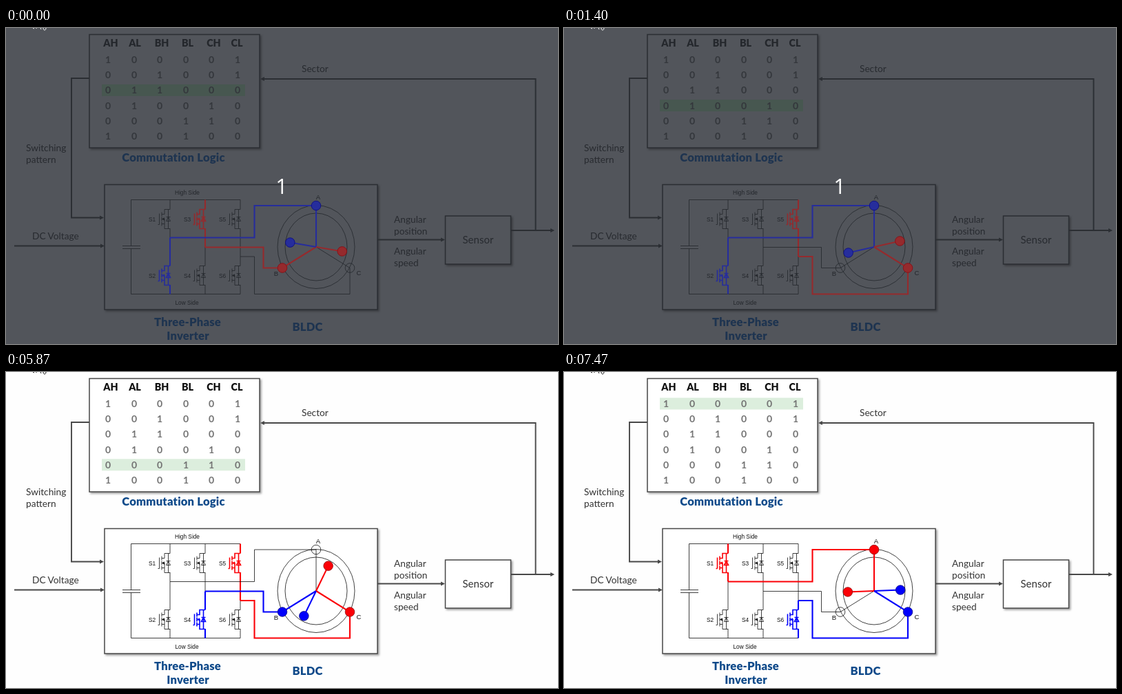
Animation of 801 by 459 pixels, one loop 8000 ms. Source, as an HTML page:

```html
<!DOCTYPE html>
<html lang="en">
<head>
<meta charset="utf-8">
<title>BLDC commutation</title>
<style>
  html, body { margin: 0; width: 100%; height: 100%; overflow: hidden; }
  svg {
    display: block; width: 801px; height: 459px;
    --bg: #fefefe; --box: #fff; --ink: #111; --line: #484848; --label: #333;
    --digit: #737373; --title: #0f4a8a; --lit: #dceedd; --red: #fb0007; --blue: #0000fb;
    --shade: rgba(0, 0, 0, .38);
    background: var(--bg);
  }
  svg.dim {
    --bg: #52555b; --box: #52555b; --ink: #24272c; --line: #2b2e33; --label: #282b30;
    --digit: #34373c; --title: #1e3450; --lit: #475750; --red: #952a2d; --blue: #262d9c;
    --shade: rgba(0, 0, 0, .3);
  }
  .box { fill: var(--box); stroke: var(--line); stroke-width: 1.5; filter: drop-shadow(2px 2px 1.5px var(--shade)); }
  .flow { fill: none; stroke: var(--line); stroke-width: 1.9; }
  .tip { fill: var(--line); }
  .lit { fill: var(--lit); }
  text { fill: var(--label); font-family: Lato, "Open Sans", sans-serif; }
  .label { font-size: 13.7px; }
  .big { font-size: 15px; }
  .title { font-size: 16.6px; font-weight: 900; letter-spacing: .2px; fill: var(--title); text-anchor: middle; }
  .head { font-size: 14.3px; font-weight: 900; fill: var(--ink); text-anchor: middle; }
  .digit { font-size: 14px; font-weight: 700; fill: var(--digit); text-anchor: middle; }
  .small { font: 8.3px "Liberation Sans", Arial, sans-serif; fill: var(--ink); }
  .mid { text-anchor: middle; }
  .pin { font-size: 9.5px; text-anchor: middle; }
  .count { font: 30.5px "Open Sans", sans-serif; fill: #fff; text-anchor: middle; }
  .scrap { fill: none; stroke: var(--ink); stroke-width: 1; }
  .dim .scrap { stroke: #fff; }
  svg:not(.dim) .count { display: none; }
  .wire { fill: none; stroke: var(--ink); stroke-width: .8; }
  .solid { fill: var(--ink); stroke: none; }
  .node { fill: none; stroke: var(--ink); stroke-width: .8; }
  .red .wire, .wire.red { stroke: var(--red); stroke-width: 2.1; }
  .blue .wire, .wire.blue { stroke: var(--blue); stroke-width: 2.1; }
  .red .part, .blue .part { stroke-width: 1.6; }
  .red .solid, .red .node, .node.red { fill: var(--red); }
  .blue .solid, .blue .node, .node.blue { fill: var(--blue); }
  .red .node, .node.red { stroke: #8c0a10; }
  .blue .node, .node.blue { stroke: #0a0a80; }
</style>
</head>
<body>
<svg id="stage" viewBox="0 0 801 459"></svg>
<script>
const stage = document.getElementById('stage');
const LOOP = 8000, DIM_END = 4600;
const CX = 450, CY = 318;

// Columns: AH AL BH BL CH CL
const ROWS = ['100001', '001001', '011000', '010010', '000110', '100100'];
const HEADS = [['AH', 152], ['AL', 187], ['BH', 226], ['BL', 263.5], ['CH', 301.5], ['CL', 335]];
const COLS = [148, 186, 223, 261, 298, 336];

// [time in ms, rotor angle in degrees]
const STEPS = [
  [0, -9], [70, -7.8], [170, -6.4], [270, -5], [530, -2.6], [730, -.6], [930, 4.4],
  [1270, 9.2], [1400, 12], [4600, 52.3], [5070, 57.5], [5870, 62.5], [6330, 77],
  [6400, 84], [6600, 102], [6670, 110], [6870, 134], [7000, 156], [7130, 180.5], [7470, 182]
];

function add(tag, attrs, parent = stage) {
  const el = document.createElementNS('http://www.w3.org/2000/svg', tag);
  for (const key in attrs) el.setAttribute(key, attrs[key]);
  return parent.appendChild(el);
}
const path = (d, cls, parent) => add('path', { d, class: cls }, parent);
const rect = (x, y, width, height, cls) => add('rect', { x, y, width, height, class: cls });
const dot = (cx, cy, cls, parent) => add('circle', { cx, cy, r: 6.8, class: cls }, parent);
function text(str, x, y, cls, parent) {
  add('text', { x, y, class: cls }, parent).textContent = str;
}
function arrow(d, x, y, dir) {
  path(d, 'flow');
  path(`M${x} ${y}l${-6 * dir} -3v6z`, 'tip');
}
const ring = (rx, ry) => add('ellipse', { cx: CX, cy: CY, rx, ry, class: 'wire' });

// Transistor with its body diode; x is the leg, y the middle
function mosfet(x, y, parent) {
  path(`M${x} ${y - 14}h-8v7h-4M${x} ${y + 14}h-8v-14h-4M${x - 12} ${y + 7}h4
    M${x - 12} ${y - 10}v6M${x - 12} ${y - 3}v6M${x - 12} ${y + 4}v6
    M${x - 15.5} ${y - 8}v16M${x - 15.5} ${y + 8}h-2
    M${x - 2.5} ${y - 14}v28M${x - 5.5} ${y - 3}h6
    M${x - 5.5} ${y + 3}h6l-3 -6z`, 'wire part', parent);
  path(`M${x - 12} ${y}l4 -2.2v4.4z`, 'solid', parent);
}

function leg(i, x, tap) {
  const high = add('g', {}), low = add('g', {});
  path(`M${x} 249.5V263.5M${x} 291V${tap}`, 'wire', high);
  mosfet(x, 277.5, high);
  path(`M${x} ${tap}V345.5M${x} 373V386.5`, 'wire', low);
  mosfet(x, 359.5, low);
  text('S' + (2 * i + 1), x - 31, 281, 'small');
  text('S' + (2 * i + 2), x - 31, 363, 'small');
  return { high, low };
}

function coil(d, x, y) {
  const g = add('g', {});
  path(`${d}L${CX} ${CY}`, 'wire', g);
  dot(x, y, 'node', g);
  return g;
}

// Remains of a caption cut by the top edge
path('M39 0l2 1M43 0h2M50 0l1 2M54 0c0 4 4 4 4 0', 'scrap');

// Commutation table
rect(121, 9.5, 247, 164.5, 'box');
const lit = rect(139, 0, 208, 17, 'lit');
const rowY = r => 46 + r * 22.2;
HEADS.forEach(([name, x]) => text(name, x, 27, 'head'));
ROWS.forEach((row, r) => [...row].forEach((bit, c) => text(bit, COLS[c], rowY(r) + 5, 'digit')));

// Block diagram
rect(143, 227.5, 396, 181.5, 'box');
rect(637.5, 273, 95, 70, 'box');
arrow('M768.5 294V74H371', 369, 74, -1);
arrow('M121 73H95V275.5H139', 142, 275.5, 1);
arrow('M12 316.5H139', 143, 316.5, 1);
arrow('M539 307.5H633', 637, 307.5, 1);
arrow('M733 294H792', 796, 294, 1);

text('Sector', 429, 64, 'label');
text('Switching', 29, 179, 'label');
text('pattern', 29, 196, 'label');
text('DC Voltage', 38, 307, 'label');
text('Angular', 563, 283, 'label');
text('position', 563, 300, 'label');
text('Angular', 563, 329, 'label');
text('speed', 563, 345.5, 'label');
text('Sensor', 662.5, 313, 'label big');
text('Commutation Logic', 243, 194, 'title');
text('Three-Phase', 263.5, 433, 'title');
text('Inverter', 264, 453, 'title');
text('BLDC', 437.5, 440, 'title');

// Inverter and motor
path('M340 249.5H181.5V316.5M169 316.5h26M169 320.5h26M181.5 320.5V386.5H340', 'wire');
ring(56, 60.5);
ring(45, 49);
const legs = [leg(0, 238, 304.5), leg(1, 289, 318.5), leg(2, 340, 332)];
const coils = [
  coil('M238 304.5H360.5V258H450', 450, 258),
  coil('M289 318.5H373.5V348.5H401', 401, 348.5),
  coil('M340 332H360.5V386.5H499V348.5', 499, 348.5)
];
const poles = ['blue', 'red'].map(hue => ({
  sign: hue === 'red' ? 1 : -1,
  arm: path('', 'wire ' + hue),
  tip: dot(0, 0, 'node ' + hue)
}));
text('High Side', 263, 242, 'small mid');
text('Low Side', 262.5, 401.5, 'small mid');
text('A', 453, 249, 'small pin');
text('B', 392, 360, 'small pin');
text('C', 512, 358.5, 'small pin');
text('1', 400, 241, 'count');

function draw(t) {
  const angle = STEPS.filter(s => s[0] <= t).pop()[1];
  const r = (Math.floor(angle / 60) + 3) % 6;
  const on = [...ROWS[r]].map(Number);

  stage.setAttribute('class', t < DIM_END ? 'dim' : '');
  lit.setAttribute('y', rowY(r) - 8.5);
  legs.forEach(({ high, low }, i) => {
    const up = on[2 * i] ? 'red' : '', down = on[2 * i + 1] ? 'blue' : '';
    high.setAttribute('class', up);
    low.setAttribute('class', down);
    coils[i].setAttribute('class', up || down);
  });

  const a = angle * Math.PI / 180;
  poles.forEach(({ sign, arm, tip }) => {
    const x = CX + sign * 38.2 * Math.cos(a), y = CY - sign * 41 * Math.sin(a);
    arm.setAttribute('d', `M${CX} ${CY}L${x} ${y}`);
    tip.setAttribute('cx', x);
    tip.setAttribute('cy', y);
  });
}

const start = performance.now();
function tick() {
  draw((performance.now() - start) % LOOP);
  requestAnimationFrame(tick);
}
tick();
</script>
</body>
</html>
```
